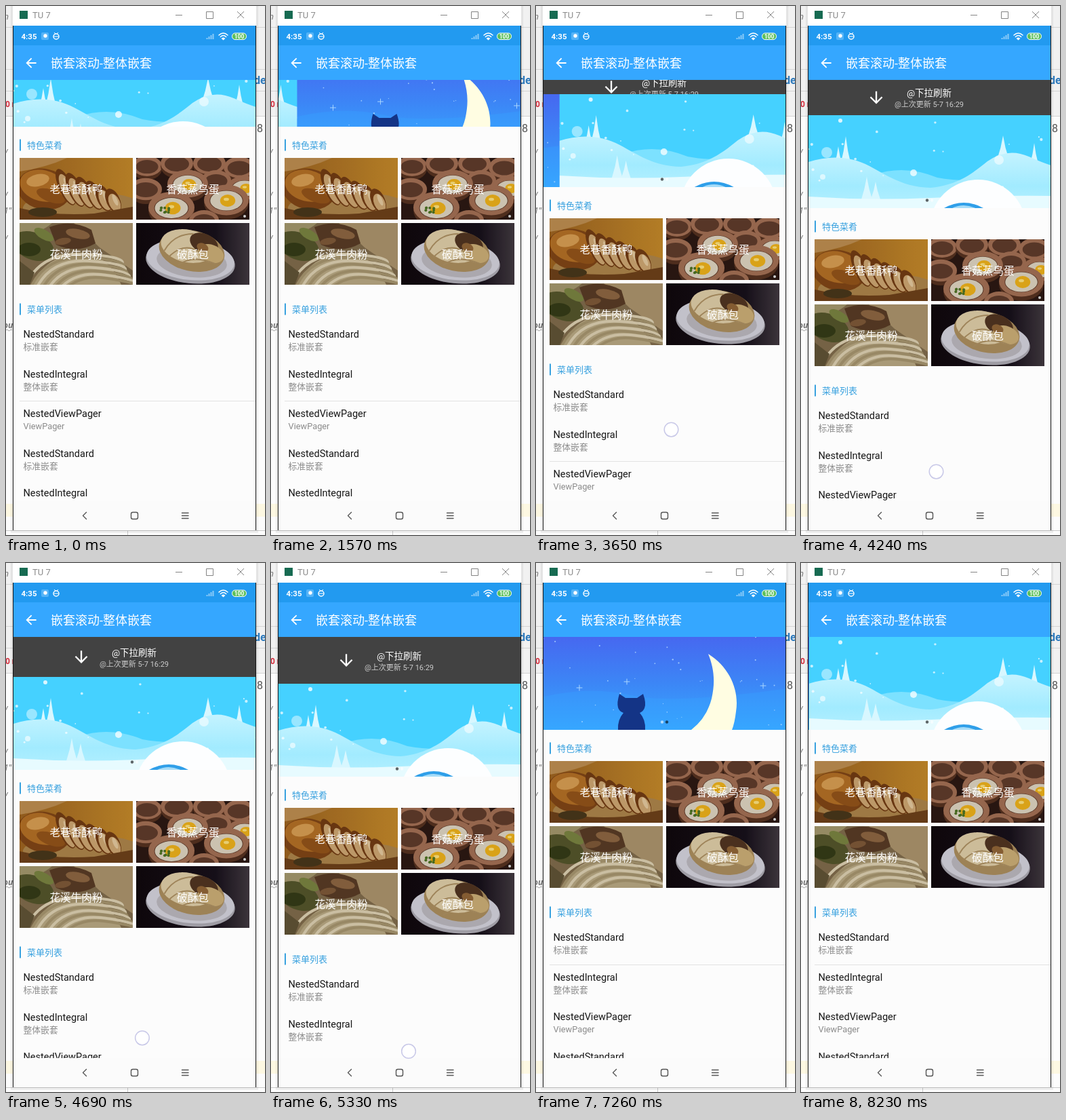
These frames come from a looping animation (382x780 px, 8480 ms). An HTML page:

```html
<!DOCTYPE html>
<html lang="zh-CN">
<head>
<meta charset="utf-8">
<title>嵌套滚动</title>
<style>
  html, body { margin: 0; width: 100%; height: 100%; overflow: hidden; background: #fff; }
  svg { display: block; width: 382px; height: 780px; font-family: Roboto, "Noto Sans CJK SC", "Noto Sans CJK", sans-serif; }
  .section { font-size: 13px; fill: #38a1df; }
  .dish { font-size: 15.6px; fill: #fff; text-anchor: middle; }
  .name { font-size: 14.5px; fill: #161616; }
  .note { font-size: 12.8px; fill: #8b8b8b; }
  .code { font: italic 12px "Noto Sans", sans-serif; fill: #777; }
  .line { fill: none; stroke-linecap: round; stroke-linejoin: round; }
</style>
</head>
<body>
<svg viewBox="0 0 382 780">
  <defs>
    <clipPath id="page"><rect x="11" y="109" width="357" height="621"/></clipPath>
    <clipPath id="banner"><rect x="11" y="109" width="357" height="137"/></clipPath>
    <clipPath id="photo"><rect width="167" height="91"/></clipPath>
    <clipPath id="pull"><rect id="pullBox" x="11" y="109" width="357" height="0"/></clipPath>
    <linearGradient id="hill" x2="0" y2="1"><stop stop-color="#c4f3ff"/><stop offset=".6" stop-color="#a2ebff"/><stop offset="1" stop-color="#b4f0ff"/></linearGradient>
    <linearGradient id="night" x2="0" y2="1"><stop stop-color="#4668f0"/><stop offset=".5" stop-color="#3c86f6"/><stop offset="1" stop-color="#36a8ff"/></linearGradient>
    <linearGradient id="roast"><stop stop-color="#99611f"/><stop offset="1" stop-color="#c08629"/></linearGradient>
    <linearGradient id="table"><stop stop-color="#0f080c"/><stop offset=".7" stop-color="#17101a"/><stop offset="1" stop-color="#40383f"/></linearGradient>
  </defs>

  <!-- desktop behind the window -->
  <rect width="382" height="780" fill="#fcfcfc"/>
  <rect width="382" height="163" fill="#f1f1f1"/>
  <path d="M0 31.5H382M0 93.5H382M0 125.5H382M0 162.5H382" stroke="#d4d4d4"/>
  <rect y="734" width="382" height="19" fill="#fdf8e2"/>
  <path d="M0 773.5H382M179.5 773V780" stroke="#c9c9c9"/>
  <g class="code">
    <text x="-3" y="20">n</text><text x="-2" y="220">/</text><text x="-2" y="283">/</text>
    <text x="-3" y="306">1"</text><text x="-2" y="347">/</text><text x="-4" y="475" font-weight="700">ou</text>
  </g>
  <path d="M0 478q1.5-2 3 0t3 0t3 0" fill="none" stroke="#999"/>
  <text x="-1" y="149" font-size="12" font-weight="700" fill="#d42a3a">0 r</text>
  <text x="366" y="115" font-size="16" font-weight="700" fill="#2f7bbd">de</text>
  <text x="370" y="186" font-size="16" fill="#555">8</text>
  <rect x="7" width="365" height="777" fill="#000" opacity=".06"/>

  <!-- window and fixed bars -->
  <rect x="10" width="359" height="773" fill="#fff"/>
  <rect x="20" y="7" width="12" height="12" fill="#176b52"/>
  <text x="39" y="18" font-size="13" fill="#8b8b8b">TU 7</text>
  <path d="M250 13.5H260M295.5 8.5H305.5V18.5H295.5ZM341 8L351 18M351 8L341 18" fill="none" stroke="#858585"/>
  <rect x="10" y="29" width="359" height="744" fill="#151515"/>
  <rect x="11" y="29" width="357" height="744" fill="#fcfcfc"/>
  <rect x="11" y="29" width="357" height="29" fill="#229af0"/>
  <rect x="11" y="58" width="357" height="51" fill="#35a7ff"/>
  <text x="22.5" y="49" font-size="11.5" font-weight="700" fill="#fff">4:35</text>
  <rect x="52" y="39" width="11" height="11" rx="2" fill="#55b4f8"/>
  <circle cx="58" cy="44" r="2.7" fill="#fff"/>
  <circle cx="74" cy="45" r="4" fill="none" stroke="#fff" stroke-width="1.5"/>
  <path d="M71 39L73 41M77 39L75 41M71 45H77" stroke="#fff"/>
  <path d="M296.5 49V47M299.5 49V45M302.5 49V43M305.5 49V41" stroke="#8bcbf8" stroke-width="2"/>
  <g class="line" stroke="#fff" stroke-width="1.5"><path d="M314 43q6.5-6 13 0M316.3 45.5q4.2-4 8.4 0M318.5 48q2-1.5 4 0"/></g>
  <circle cx="320.5" cy="49" r="1.3" fill="#fff"/>
  <rect x="333.5" y="40" width="21" height="9.5" rx="4.5" fill="#5cc05c" stroke="#fff"/>
  <text x="344" y="48" font-size="8.5" font-weight="700" fill="#fff" text-anchor="middle">100</text>
  <path transform="translate(25.6 72.6) scale(.95)" fill="#fff" d="M20 11H7.800L13.400 5.400 12 4 4 12 12 20 13.400 18.600 7.800 13H20Z"/>
  <text x="66" y="91" font-size="18" fill="#fff">嵌套滚动-整体嵌套</text>

  <g clip-path="url(#page)">
    <g clip-path="url(#pull)">
      <rect x="11" y="109" width="357" height="100" fill="#424242"/>
      <g id="pullText" text-anchor="middle">
        <path transform="translate(97 -14) scale(1.170)" fill="#fff" d="M20 12L18.600 10.600 13 16.200V4H11V16.200L5.400 10.600 4 12 12 20Z"/>
        <text x="189" y="-2" font-size="13.5" fill="#fff">@下拉刷新</text>
        <text x="189" y="14" font-size="11" fill="#ccc">@上次更新 5-7 16:29</text>
      </g>
    </g>
    <g id="content">
      <g clip-path="url(#banner)">
        <g id="scene">
          <g id="snow"></g>
          <g id="cat"></g>
          <circle class="dot" cx="186" cy="234.500" r="2.200"/>
          <circle class="dot" cx="193" cy="234.500" r="2.200"/>
        </g>
      </g>
      <g id="list"></g>
    </g>
  </g>

  <rect x="11" y="730" width="357" height="43" fill="#fbfbfb"/>
  <g class="line" stroke="#555" stroke-width="1.4">
    <path d="M118.5 746.5L113.5 751.5L118.5 756.5M259.5 747.5H269M259.5 751.5H269M259.5 755.5H269"/>
    <rect x="184.5" y="746.5" width="10" height="10" rx="2.5"/>
  </g>
  <g id="touch"><circle r="10.3" fill="#fff" fill-opacity=".85" stroke="#c9c9e8" stroke-width="1.5"/></g>
</svg>
<script>
const LOOP = 8480, PAGE_W = 357;
const el = id => document.getElementById(id);
const circle = (x, y, r, fill, more = '') => `<circle cx="${x}" cy="${y}" r="${r}" fill="${fill}" ${more}/>`;
const oval = (x, y, rx, ry, fill, turn = 0) =>
  `<ellipse cx="${x}" cy="${y}" rx="${rx}" ry="${ry}" fill="${fill}" transform="rotate(${turn} ${x} ${y})"/>`;
const path = (d, fill) => `<path d="${d}" fill="${fill}"/>`;
const stroke = (d, color, width) => `<path class="line" d="${d}" stroke="${color}" stroke-width="${width}"/>`;
const fillRect = (w, h, fill) => `<rect width="${w}" height="${h}" fill="${fill}"/>`;
const repeat = (n, draw) => Array.from({ length: n }, (_, i) => draw(i)).join('');

let seed = 11;
const random = () => (seed = seed * 16807 % 2147483647) / 2147483647;

// Scenes use coordinates relative to the banner's top left corner.
const tree = (x, top, base, w) =>
  path(`M${x} ${top}Q${x + w * .3} ${(top + base) / 2} ${x + w} ${base}H${x - w}Q${x - w * .3} ${(top + base) / 2} ${x} ${top}`, '#d8f7ff');

function snowScene() {
  return fillRect(358, 137, '#45d1ff') +
    path('M0 105Q60 84 95 88Q142 72 190 92Q250 104 358 80V137H0Z', '#7ce1ff') +
    tree(44, 46, 74, 6) + tree(55, 31, 74, 8) + tree(287, 30, 66, 9) + tree(333, 41, 72, 6) +
    path('M0 69C30 59 62 60 90 75S140 106 180 107C222 103 244 84 264 68Q294 47 325 61Q345 70 358 74V137H0Z', 'url(#hill)') +
    tree(86, 90, 124, 8) + tree(99, 98, 124, 7) +
    path('M0 120Q90 126 180 122T358 119V137H0Z', '#e7fbff') +
    circle(250, 166, 71, '#fdfeff') +
    path('M200 137Q229 121 258 137Z', '#2f9fe9') + path('M212 137Q229 129 246 137Z', '#a6dcf8') +
    circle(27, 55, 8, '#fff', 'opacity=".45"') + circle(281, 66, 7, '#fff', 'opacity=".55"') +
    circle(155, 85, 5, '#fff', 'opacity=".75"') + circle(21, 91, 4, '#fff', 'opacity=".6"') +
    circle(47, 8, 3, '#fff', 'opacity=".8"') +
    repeat(18, () => circle(random() * 358, random() * 112, .8 + random() * 1.5, '#fff', 'opacity=".7"'));
}

function catScene() {
  const star = (x, y) => stroke(`M${x - 4} ${y}h8M${x} ${y - 4}v8`, '#a9d6ff', 1);
  return fillRect(358, 137, 'url(#night)') +
    path('M0 88Q70 72 130 86T358 76V137H0Z', '#38a3ff55') +
    repeat(32, () => circle(random() * 358, random() * 130, .5 + random() * .7, '#b5dcff', 'opacity=".8"')) +
    star(53, 75) + star(123, 66) + star(324, 72) +
    path('M243 25C275 45 289 79 284 110Q282 127 278 137H218Q241 119 248 91C254 65 251 45 243 25Z', '#fffde2') +
    path('M112 84L121 90H138L147 84Q152 98 149 105Q147 110 142 112Q151 122 150 137H110Q109 122 118 112Q111 109 110 104Q108 97 112 84Z', '#143486');
}

// Dish photos, 167 by 91.
const duck = () => fillRect(167, 91, 'url(#roast)') +
  path('M0 0H70Q40 14 0 20Z', '#b98a4e') + oval(95, 74, 90, 24, '#a98249') +
  oval(36, 46, 40, 30, '#7d4415', 12) + oval(34, 41, 34, 23, '#b06d24', 14) + oval(27, 33, 17, 9, '#d39a50', -12) +
  oval(46, 56, 22, 9, '#8f5119', 20) +
  repeat(6, i => oval(68 + i * 14, 43 + i * 4, 10, 29 - i * 2, '#6f3a12', -24) + oval(70 + i * 14, 46 + i * 4, 8, 24 - i * 2, '#c9a36f', -24) +
    oval(71 + i * 14, 42 + i * 4, 3, 14 - i, '#dfc49a', -24)) +
  path('M0 74Q50 86 110 82L167 72V91H0Z', '#6b3f19') + oval(34, 80, 21, 7, '#47361a');

function eggs() {
  const cup = (x, y, rx) => oval(x, y + 4, rx, rx * .75, '#54301f') + oval(x, y, rx, rx * .68, '#a06d52') +
    oval(x, y + 1, rx * .75, rx * .46, '#5d3a2a');
  const egg = (x, y, rx) => cup(x, y, rx) + oval(x, y + 1, rx * .72, rx * .44, '#d9d0bd') +
    oval(x + 2, y + 1, rx * .34, rx * .27, '#e8ae1a') + oval(x, y - 1, rx * .12, rx * .07, '#f7dc7a');
  return fillRect(167, 91, '#2b1812') + cup(16, 12, 22) + cup(60, 8, 24) + cup(108, 8, 24) + cup(152, 14, 23) +
    cup(14, 46, 24) + cup(118, 33, 22) + egg(76, 38, 30) + egg(160, 44, 26) + egg(133, 62, 33) + egg(52, 73, 34) +
    cup(100, 92, 22) +
    repeat(9, i => circle(36 + i % 3 * 5 + random() * 3, 72 + random() * 9, 2, '#4c7022')) + circle(160, 86, 2, '#ddd');
}

const noodles = () => fillRect(167, 91, '#7d694a') +
  path('M80 0H167V70L118 36Z', '#a8916a') + path('M0 0H48Q30 16 0 18Z', '#a0946a') +
  oval(20, 34, 32, 20, '#53542a', 22) + oval(14, 39, 17, 10, '#333a17') + oval(36, 17, 16, 7, '#77803f', 30) +
  path('M44 6Q76 -6 106 10L112 30Q84 46 54 32Z', '#573a24') + oval(86, 16, 18, 7, '#8a6440', 12) + oval(64, 27, 12, 5, '#7b5737', -10) +
  path('M18 91Q40 48 86 44Q130 44 150 91Z', '#b5a580') +
  repeat(8, i => stroke(`M${8 + i * 9} 94Q${30 + i * 9} ${42 + i * 5} ${96 + i * 4} ${46 + i * 5}T${150 + i * 3} ${62 + i * 4}`, i % 2 ? '#a3926c' : '#d8ccae', 4)) +
  path('M0 56L22 73L15 91H0Z', '#5e5134');

const bun = () => fillRect(167, 91, 'url(#table)') +
  oval(80, 57, 66, 32, '#a9a7b0', 6) + oval(80, 54, 65, 30, '#d0cfd8', 6) + oval(82, 57, 52, 23, '#b7b4ba', 6) +
  oval(82, 41, 49, 30, '#a88b5c', 12) + oval(76, 34, 40, 24, '#dbc9a4', 12) +
  oval(100, 30, 22, 14, '#4f3320', 25) + oval(110, 45, 20, 13, '#c7aa74', 20) + oval(98, 36, 9, 6, '#8d6336', 25) +
  stroke('M42 40Q56 16 84 16M48 50Q70 28 92 42M62 62Q84 46 116 60', '#a98d60', 2);

const dishes = [['老巷香酥鸭', duck], ['香菇蒸鸟蛋', eggs], ['花溪牛肉粉', noodles], ['破酥包', bun]];
const rows = [['NestedStandard', '标准嵌套'], ['NestedIntegral', '整体嵌套'], ['NestedViewPager', 'ViewPager'],
  ['NestedStandard', '标准嵌套'], ['NestedIntegral', '整体嵌套']];

const section = (label, y) => `<rect x="20" y="${y - 13.5}" width="2" height="17" fill="#38a1df"/><text class="section" x="31" y="${y}">${label}</text>`;
const dishCard = ([label, draw], i) => `<g transform="translate(${20 + i % 2 * 172} ${292 + (i >> 1) * 96})">
  <g clip-path="url(#photo)">${draw()}${fillRect(167, 91, '#0001')}</g><text class="dish" x="83.5" y="51.5">${label}</text></g>`;
const listRow = ([name, note], i) => {
  const y = 557 + i * 58.6;
  return `<text class="name" x="25.5" y="${y}">${name}</text><text class="note" x="25.5" y="${y + 18}">${note}</text>`;
};

el('snow').innerHTML = snowScene();
el('cat').innerHTML = catScene();
el('list').innerHTML = section('特色菜肴', 278) + dishes.map(dishCard).join('') + section('菜单列表', 520) +
  '<path id="press" d="M17 534H365L366.500 549V577L365 592H17L14 577V549Z" fill="#dadada"/>' +
  rows.map(listRow).join('') +
  repeat(2, i => `<path class="divider" d="M20 ${592.5 + i * 58}H368" stroke="#e2e2e2"/>`);
const dots = document.querySelectorAll('.dot'), dividers = document.querySelectorAll('.divider');

const clamp = v => Math.min(1, Math.max(0, v));
const easeOut = (u, power) => 1 - (1 - u) ** power;

const drag = [[0, -68.33], [2560, -68.33], [2820, -43], [3650, 20.67], [4240, 52.33], [5330, 69.33], [5950, 69.33]];
function scrollAt(t) {
  if (t >= 5950) return 69.33 * (1 - easeOut(clamp((t - 5950) / 530), 3.1));
  const i = drag.findIndex(([time]) => time > t);
  const [t0, a] = drag[i - 1], [t1, b] = drag[i];
  return a + (b - a) * (t - t0) / (t1 - t0);
}

const slideAt = t => [0, 1, 2, 3].reduce((sum, i) => sum + easeOut(clamp((t - 1250 - i * 2062) / 800), 5), 0);
const move = (id, x, y) => el(id).setAttribute('transform', `translate(${x} ${y})`);

function draw() {
  const t = performance.now() % LOOP;
  const scroll = scrollAt(t), shift = Math.round(scroll), pulled = Math.max(0, shift);
  move('content', 0, shift);
  move('scene', 0, shift < 0 ? Math.round(-shift / 2) : 0);
  el('pullBox').setAttribute('height', pulled);
  move('pullText', 0, 109 + pulled / 2);

  const slide = slideAt(t), from = Math.floor(slide), part = slide - from;
  const leaving = 11 - part * PAGE_W, entering = leaving + PAGE_W;
  move('snow', from % 2 ? entering : leaving, 109);
  move('cat', from % 2 ? leaving : entering, 109);
  const active = Math.round(slide) % 2;
  dots.forEach((dot, i) => dot.setAttribute('fill', i === active ? '#0009' : '#fff9'));

  // A hairline shows only where it lands on a sampled device row.
  dividers.forEach((line, i) => line.style.opacity = (Math.round(scroll * 3) + i) % 3 ? 0 : 1);

  move('touch', 199.5 + 3.5 * clamp((t - 4240) / 1090), 584 + scroll * (scroll < 0 ? .86 : 1.96));
  el('touch').style.opacity = t < 2480 ? 0 : clamp((6000 - t) / 80);
  el('press').style.opacity = t < 2600 ? 0 : clamp((3060 - t) / 120);
  requestAnimationFrame(draw);
}
draw();
</script>
</body>
</html>
```
